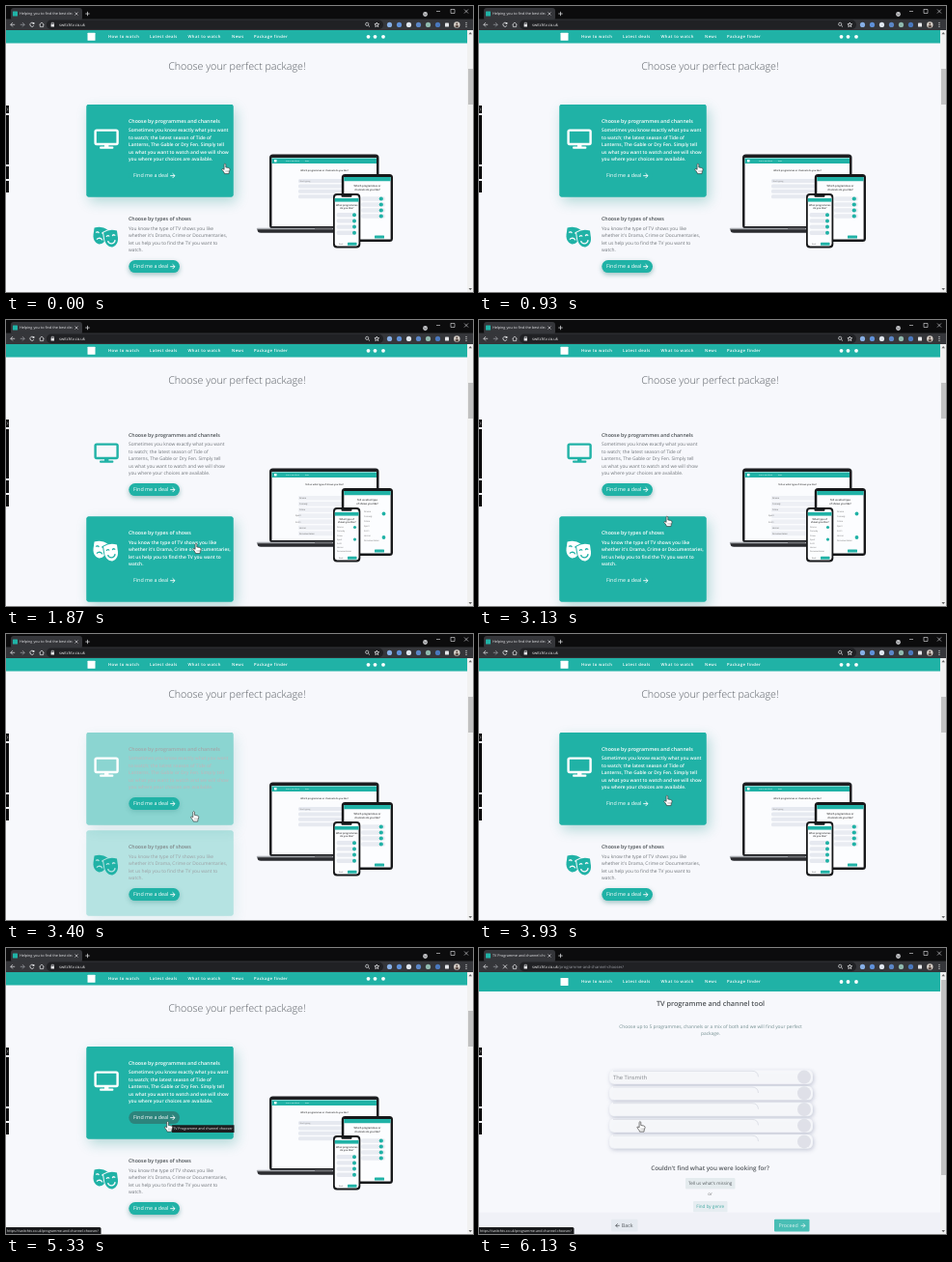
These frames come from a looping animation (484 by 296 pixels, 6190 ms). An HTML page with a canvas:

```html
<!DOCTYPE html>
<html lang="en">
<head>
<meta charset="utf-8">
<title>Package chooser</title>
<style>
html, body { margin: 0; width: 100%; height: 100%; overflow: hidden; background: #f7f8fc; }
canvas { display: block; width: 484px; height: 296px; }
</style>
</head>
<body>
<canvas id="stage"></canvas>
<script>
const W = 484, H = 296, LOOP = 6190, STEP = 1000 / 15;
const TEAL = [32, 178, 166], PAGE = [247, 248, 252], WHITE = [255, 255, 255];
const FONT = '"Open Sans", "Noto Sans", sans-serif';
const canvas = document.getElementById('stage');
const ctx = canvas.getContext('2d');
const dpr = Math.max(1, window.devicePixelRatio || 1);
canvas.width = W * dpr;
canvas.height = H * dpr;

const clamp = v => Math.max(0, Math.min(1, v));
const ease = v => { v = clamp(v); return v * v * (3 - 2 * v); };
const rgb = c => `rgb(${c.map(Math.round).join()})`;
const mix = (a, b, k) => a.map((v, i) => v + (b[i] - v) * k);
const teal = rgb(TEAL);

function box(x, y, w, h, color, r = 0) {
  ctx.fillStyle = color;
  ctx.beginPath();
  ctx.roundRect(x, y, w, h, r);
  ctx.fill();
}
function dot(x, y, r, color) {
  ctx.fillStyle = color;
  ctx.beginPath();
  ctx.arc(x, y, r, 0, 7);
  ctx.fill();
}
function line(color, width, ...runs) {
  ctx.strokeStyle = color;
  ctx.lineWidth = width;
  ctx.beginPath();
  for (const p of runs) {
    ctx.moveTo(p[0], p[1]);
    for (let i = 2; i < p.length; i += 2) ctx.lineTo(p[i], p[i + 1]);
  }
  ctx.stroke();
}
// y is the middle of the capital letters
function text(s, x, y, size, color, weight = 400, align = 'left', gap = 0) {
  ctx.font = `${weight} ${size}px ${FONT}`;
  ctx.letterSpacing = gap + 'px';
  ctx.textAlign = align;
  ctx.fillStyle = color;
  ctx.fillText(s, x, y + size * 0.35);
}
function shadow(color, blur, dx, dy, draw) {
  ctx.save();
  ctx.shadowColor = color;
  ctx.shadowBlur = blur * dpr;
  ctx.shadowOffsetX = dx * dpr;
  ctx.shadowOffsetY = dy * dpr;
  draw();
  ctx.restore();
}
function arrow(x, y, dir, color, s = 2.4, w = 0.9) {
  line(color, w, [x - s * dir, y, x + s * dir, y], [x, y - s, x + s * dir, y, x, y + s]);
}

function browser(loaded) {
  const ink = '#e4e5e8', dim = '#9fa2a8';
  box(0, 0, W, 14, '#0c0c0d');
  box(5, 2, 74, 13, '#35363a', 3);
  box(0, 13.5, W, 11.5, '#35363a');
  box(7, 5.5, 5, 5, teal, 0.5);
  ctx.save();
  ctx.beginPath();
  ctx.rect(14, 2, 54.5, 11);
  ctx.clip();
  text(loaded ? 'TV Programme and channel chooser' : 'Helping you to find the best deal', 14, 8, 3.75, ink);
  ctx.restore();
  line(ink, 0.6, [71.5, 6.5, 74.5, 9.5], [74.5, 6.5, 71.5, 9.5]);
  line(ink, 0.7, [82.3, 8, 86.7, 8], [84.5, 5.8, 84.5, 10.2]);
  dot(434.5, 8.5, 2.4, '#c8c9cc');
  line('#222', 0.6, [433.3, 8, 434.5, 9.2, 435.7, 8]);
  line(ink, 0.6, [446, 5.5, 450, 5.5], [461, 3.5, 465, 3.5, 465, 7.5, 461, 7.5, 461, 3.2],
    [475, 3.5, 479, 7.5], [479, 3.5, 475, 7.5]);

  box(42, 14.6, 349, 9.6, '#202124', 4.8);
  arrow(7, 19.3, -1, ink, 2.2, 0.7);
  arrow(17, 19.3, 1, dim, 2.2, 0.7);
  if (loaded) line(ink, 0.8, [25, 17.3, 29, 21.3], [29, 17.3, 25, 21.3]);
  else {
    ctx.strokeStyle = ink;
    ctx.lineWidth = 0.8;
    ctx.beginPath();
    ctx.arc(27, 19.3, 2.1, 0.4, 5.5);
    ctx.stroke();
    box(27.6, 17, 1.8, 1.8, ink);
  }
  line(ink, 0.7, [34.5, 19.3, 37, 17, 39.5, 19.3], [35.3, 19, 35.3, 21.6, 38.7, 21.6, 38.7, 19]);
  box(46.6, 18.8, 3.4, 2.7, ink, 0.3);
  line(ink, 0.6, [47.2, 19, 47.2, 17.3, 49.4, 17.3, 49.4, 19]);
  text('switchtv.co.uk', 55, 19.3, 4.15, '#f2f2f3');
  if (loaded) {
    const w = ctx.measureText('switchtv.co.uk').width;
    text('/programme-and-channel-chooser/', 55 + w, 19.3, 4.15, dim);
  }
  ctx.strokeStyle = ink;
  ctx.lineWidth = 0.7;
  ctx.beginPath();
  ctx.arc(374.2, 18.8, 1.6, 0, 7);
  ctx.stroke();
  line(ink, 0.8, [375.4, 20, 377, 21.6]);
  ctx.beginPath();
  for (let i = 0; i <= 10; i++) {
    const a = i * Math.PI / 5 - Math.PI / 2, r = i % 2 ? 1.1 : 2.5;
    ctx.lineTo(384.3 + r * Math.cos(a), 19.5 + r * Math.sin(a));
  }
  ctx.stroke();
  ['#86aee4', '#5f90d8', '#dfe6ee', '#5b86c6', '#8fb9ae', '#4a78bd']
    .forEach((c, i) => dot(397.5 + i * 10, 19.4, 2.6, c));
  box(455, 17.6, 4, 4, ink, 0.6);
  dot(467.3, 19.4, 3.2, '#d9d2cb');
  dot(467.3, 18.5, 1.1, '#5b4a44');
  box(465.5, 19.9, 3.6, 2, '#5b4a44', 1);
  for (let i = 0; i < 3; i++) dot(477, 17.4 + i * 2, 0.55, ink);
}

function header(h, y) {
  box(0, 25, 478, h, teal);
  box(84.5, y - 4, 8, 8, '#fff', 0.5);
  [['How to watch', 106], ['Latest deals', 149], ['What to watch', 188.5], ['News', 234], ['Package finder', 257]]
    .forEach(([s, x]) => text(s, x, y, 4.2, '#fff', 600, 'left', 0.38));
  [375.5, 382.5, 391].forEach(x => dot(x, y, 1.9, '#fff'));
}

function scrollbar(top, height) {
  box(478, 25, 6, 271, '#f1f1f1');
  box(479, top, 5, height, '#c1c1c1');
  ctx.fillStyle = '#666';
  ctx.beginPath();
  ctx.moveTo(479.5, 29.3); ctx.lineTo(481.2, 27); ctx.lineTo(483, 29.3);
  ctx.moveTo(479.5, 292); ctx.lineTo(481.2, 294.3); ctx.lineTo(483, 292);
  ctx.fill();
}

function sideTabs() {
  [[103, 8], [113, 51], [166, 13], [181, 12]].forEach(([y, h]) => box(0, y, 3, h, '#0b0b0c'));
  line('#ddd', 0.5, [1, 105.5, 2, 107, 1, 108.5]);
}

function tv(color) {
  ctx.strokeStyle = color;
  ctx.lineWidth = 2.4;
  ctx.beginPath();
  ctx.roundRect(92.6, 128.6, 23, 14.4, 1.4);
  ctx.stroke();
  box(102, 143.5, 4.4, 3.5, color);
  box(97, 145.6, 14.4, 2.2, color, 1);
}

function mask(x, y, turn, smile, color, back) {
  ctx.save();
  ctx.translate(x, y);
  ctx.rotate(turn);
  ctx.beginPath();
  ctx.moveTo(-7, -7);
  ctx.quadraticCurveTo(0, -10.5, 7, -7);
  ctx.lineTo(7, 0);
  ctx.bezierCurveTo(7, 6, 2.5, 9, 0, 9);
  ctx.bezierCurveTo(-2.5, 9, -7, 6, -7, 0);
  ctx.closePath();
  ctx.strokeStyle = back;
  ctx.lineWidth = 2;
  ctx.stroke();
  ctx.fillStyle = color;
  ctx.fill();
  ctx.strokeStyle = back;
  ctx.lineWidth = 1.3;
  for (const s of [-3.1, 3.1]) {
    ctx.beginPath();
    ctx.arc(s, -1.8, 1.5, Math.PI * 1.1, Math.PI * 1.9);
    ctx.stroke();
  }
  ctx.beginPath();
  if (smile) ctx.arc(0, 1.6, 3.8, 0.15, Math.PI - 0.15);
  else ctx.arc(0, 6, 3.2, Math.PI * 1.15, Math.PI * 1.85);
  ctx.stroke();
  ctx.restore();
}

const cards = [
  { y: 102, h: 95.5, title: 'Choose by programmes and channels', lines: [
    'Sometimes you know exactly what you want',
    'to watch; the latest season of Tide of',
    'Lanterns, The Gable or Dry Fen. Simply tell',
    'us what you want to watch and we will show',
    'you where your choices are available.'] },
  { y: 203.5, h: 88, title: 'Choose by types of shows', lines: [
    'You know the type of TV shows you like',
    "whether it's Drama, Crime or Documentaries,",
    'let us help you to find the TV you want to',
    'watch.'] }
];

function card(i, k, over, press) {
  const c = cards[i], back = rgb(mix(PAGE, TEAL, k));
  if (k > 0) {
    ctx.globalAlpha = k;
    shadow('rgba(32,150,140,0.32)', 13, 3, 5, () => box(83.5, c.y, 152, c.h, teal, 2));
    ctx.globalAlpha = 1;
    box(83.5, c.y, 152, c.h, back, 2);
  }
  const icon = over ? '#fff' : teal;
  if (i === 0) tv(icon);
  else {
    mask(97.5, 237.5, 0.14, false, icon, back);
    mask(109, 240.5, -0.14, true, icon, back);
  }
  text(c.title, 127, c.y + 17, 5.25, rgb(mix([70, 76, 80], WHITE, k)), 600);
  const ink = rgb(mix([112, 117, 122], WHITE, k));
  c.lines.forEach((s, n) => text(s, 127, c.y + 26.6 + n * 7.45, 4.85, ink, k > 0.5 ? 600 : 400));
  const by = c.y + c.lines.length * 7.45 + 29.8;
  const fill = rgb(mix(TEAL, [44, 132, 124], press));
  const pill = () => box(127.3, by, 52.7, 13, fill, 6.5);
  if (k < 1) shadow(`rgba(20,110,105,${0.4 * (1 - k)})`, 5, 0, 2, pill);
  else pill();
  text('Find me a deal', 132, by + 6.5, 5.35, '#fff');
  arrow(172.6, by + 6.6, 1, '#fff');
}

// The three device screens share one list; the second view shows show types.
function devices(types) {
  const title = types ? 'Tell us what type of shows you like?' : 'Which programmes or channels do you like?';
  const kinds = ['Drama', 'Comedy', 'Crime', 'Sport', 'Sci-Fi', 'Horror', 'Documentaries'];
  box(273, 153.5, 113.5, 77, '#1c1d20', 3.5);
  box(275.5, 157, 108.5, 71, '#fbfcfe');
  box(275.5, 157.5, 108.5, 5.5, teal);
  box(278, 159, 2.5, 2.5, '#fff');
  ['How to watch', 'Deals', 'News'].forEach((s, i) => text(s, 290 + i * 10, 160.3, 1.6, '#fff'));
  text(title, 330, 170, 2.35, '#333', 600, 'center');
  if (types) kinds.forEach((s, i) => {
    box(303, 182 + i * 6.1, 58, 4.6, '#eef0f5', 1);
    text(s, i > 2 && i < 5 ? 300 : 304, 184.4 + i * 6.1, 2.2, '#555');
  });
  else for (let i = 0; i < 4; i++) {
    box(303, 179 + i * 5.4, 55, 4, '#e6e9f0', 1.5);
    if (!i) text('Start typing', 304.5, 181, 2, '#777');
  }
  box(260, 229.8, 138, 2, '#a6a9ae', 0.5);
  box(260.5, 231.2, 137, 3.6, '#2a2b2f', [0, 0, 4, 4]);
  box(320, 229.8, 18, 1.3, '#6b6d72', 0.6);

  box(347.8, 174, 53.2, 70, '#17181a', 3.5);
  box(350.3, 177, 48.3, 64.5, '#fcfdff', 0.5);
  box(350.3, 177, 48.3, 4.2, teal);
  text(types ? 'Tell us what type' : 'Which programmes or', 374.5, 186.5, 2.6, '#333', 600, 'center');
  text(types ? 'of shows you like?' : 'channels do you like?', 374.5, 190, 2.6, '#333', 600, 'center');
  if (types) {
    kinds.forEach((s, i) => text(s, 371, 198.5 + i * 5, 2.2, '#666'));
    dot(391.5, 200.5, 1.9, teal);
    dot(391.5, 225, 1.9, teal);
  } else for (let i = 0; i < 4; i++) {
    box(368, 197.2 + i * 6, 25, 4.6, '#e9ecf2', 2);
    dot(388.8, 199.5 + i * 6, 2.1, teal);
  }
  box(382, 237.4, 10, 3.2, teal, 0.6);

  box(339, 194, 28.3, 56.5, '#17181a', 4);
  box(340.8, 196, 24.7, 52.5, '#fcfdff', 2.4);
  box(347.5, 195.5, 11, 2.2, '#17181a', 1);
  box(340.8, 199, 24.7, 3.6, teal);
  text(types ? 'What type of' : 'What programmes', 353.2, 206, 2.5, '#333', 600, 'center');
  text(types ? 'shows you like?' : 'do you like?', 353.2, 209.5, 2.5, '#333', 600, 'center');
  if (types) kinds.forEach((s, i) => {
    text(s, 343, 214.5 + i * 4.2, 2.1, '#666');
    if (i === 0 || i === 3) dot(361.5, 214.5 + i * 4.2, 1.6, teal);
  });
  else for (let i = 0; i < 4; i++) {
    box(342.5, 214 + i * 6.2, 20.5, 4.4, '#e6e9f0', 2);
    dot(361, 216.2 + i * 6.2, 2, teal);
  }
  box(354, 244.8, 9.5, 3, teal, 0.6);
  text('Back', 345, 246.3, 2, '#666');
}

function home(t) {
  const onTop = t < 1490 || t >= 3250;
  const first = t < 2500 ? 1 - ease((t - 1460) / 300) : ease((t - 3250) / 300);
  const second = t < 2500 ? ease((t - 1490) / 300) : 1 - ease((t - 3210) / 300);
  header(13.5, 31.8);
  text('Choose your perfect package!', 239.3, 62.5, 10.7, '#565b61', 300, 'center');
  devices(t >= 1620 && t < 3380);
  card(1, second, !onTop, 0);
  card(0, first, onTop, ease((t - 4400) / 200));
  scrollbar(65, 37);
  if (t >= 5000) {
    box(172, 183.3, 64.5, 7.8, '#1d1d1f');
    text('TV Programme and channel chooser', 173.2, 187.2, 3.65, '#eee');
  }
}

function chooser(t) {
  header(20, 35);
  ctx.globalAlpha = clamp(0.65 + (t - 6067) / 66 * 0.15);
  text('TV programme and channel tool', 240, 57.3, 7.25, '#23282c', 600, 'center');
  text('Choose up to 5 programmes, channels or a mix of both and we will find your perfect',
    240, 81, 4.85, '#527476', 400, 'center');
  text('package.', 240, 88, 4.85, '#527476', 400, 'center');
  for (let i = 0; i < 5; i++) {
    const y = 126.3 + i * 16.7;
    shadow('rgba(70,80,120,0.35)', 4, 1, 1.5, () => box(135, y, 211, 14.6, '#f6f7fb', 5));
    box(135.5, y + 0.5, 210, 13.4, '#f8f9fc', 5);
    ctx.strokeStyle = '#c9cdd8';
    ctx.lineWidth = 0.7;
    ctx.beginPath();
    ctx.moveTo(139, y + 1);
    ctx.lineTo(283, y + 1);
    ctx.quadraticCurveTo(289, y + 1, 289.5, y + 7);
    ctx.stroke();
    dot(337, y + 7.3, 7, '#d9dbe4');
  }
  text('The Tinsmith', 139, 134, 5.8, '#666b70');
  text("Couldn't find what you were looking for?", 239.5, 227.3, 6.3, '#2b3034', 600, 'center');
  box(214, 238, 51.5, 11.5, '#e0e9ec', 1);
  text("Tell us what's missing", 239.7, 243.8, 4.55, '#30363a', 400, 'center');
  text('or', 239.5, 254.3, 4.5, '#555', 400, 'center');
  box(222, 262, 35.5, 11.5, '#e3ecef', 1);
  text('Find by genre', 239.7, 267.8, 4.6, '#1d9a90', 400, 'center');
  box(0, 273.5, 478, 22.5, '#eff1f7');
  box(137, 280.8, 27.5, 12.8, '#e2e8ee', 1);
  arrow(143.7, 287.3, -1, '#30363a', 2, 0.8);
  text('Back', 147.8, 287.3, 5.3, '#30363a');
  box(306, 280.8, 36.5, 12.8, teal, 1);
  text('Proceed', 310.5, 287.3, 5.3, '#fff');
  arrow(335.8, 287.3, 1, '#fff', 2.2);
  ctx.globalAlpha = 1;
  scrollbar(33, 202);
}

const path = [
  [0, 228, 168], [1200, 228, 168], [1470, 206, 196], [1530, 199, 227], [1800, 198, 236],
  [2600, 198, 236], [3130, 196, 208], [3270, 195.5, 196], [3600, 196, 174], [3930, 196, 172],
  [4130, 196, 172], [4600, 169, 184.5], [LOOP, 168, 184.5]
];

function cursor(t) {
  let i = 0;
  while (i < path.length - 2 && path[i + 1][0] <= t) i++;
  const [t0, x0, y0] = path[i], [t1, x1, y1] = path[i + 1];
  const k = ease((t - t0) / (t1 - t0));
  ctx.save();
  ctx.translate(x0 + (x1 - x0) * k, y0 + (y1 - y0) * k);
  ctx.beginPath();
  ctx.moveTo(-1.9, -4.2);
  ctx.quadraticCurveTo(-1.1, -5.8, -0.2, -4.2);
  ctx.lineTo(-0.2, -1);
  ctx.lineTo(2.6, -0.5);
  ctx.quadraticCurveTo(4.2, -0.1, 4.1, 1.2);
  ctx.lineTo(3.2, 4.2);
  ctx.lineTo(3, 5.6);
  ctx.lineTo(-1.5, 5.6);
  ctx.lineTo(-2, 4.2);
  ctx.lineTo(-4.1, 1.4);
  ctx.quadraticCurveTo(-4, 0, -2.8, 0.7);
  ctx.lineTo(-1.9, 1.4);
  ctx.closePath();
  ctx.fillStyle = '#fff';
  ctx.fill();
  ctx.strokeStyle = '#333';
  ctx.lineWidth = 0.65;
  ctx.stroke();
  line('#777', 0.4, [0, 2, 0, 4], [1.3, 2, 1.3, 4], [2.6, 2, 2.5, 4]);
  ctx.restore();
}

function draw(t) {
  const loaded = t >= 6060;
  ctx.setTransform(dpr, 0, 0, dpr, 0, 0);
  ctx.textRendering = 'geometricPrecision';
  ctx.textBaseline = 'alphabetic';
  box(0, 0, W, H, rgb(PAGE));
  if (loaded) chooser(t);
  else home(t);
  sideTabs();
  browser(loaded);
  if (t >= 4460) {
    box(0, 289, 98.5, 7, '#18191b', [0, 1.5, 0, 0]);
    text('https://switchtv.co.uk/programme-and-channel-chooser/', 1, 292.6, 3.6, '#f0f0f0');
  }
  cursor(t);
}

const start = performance.now();
function tick() {
  const t = (performance.now() - start) % LOOP;
  draw(Math.floor((t + 4) / STEP) * STEP);
  requestAnimationFrame(tick);
}
tick();
</script>
</body>
</html>
```
